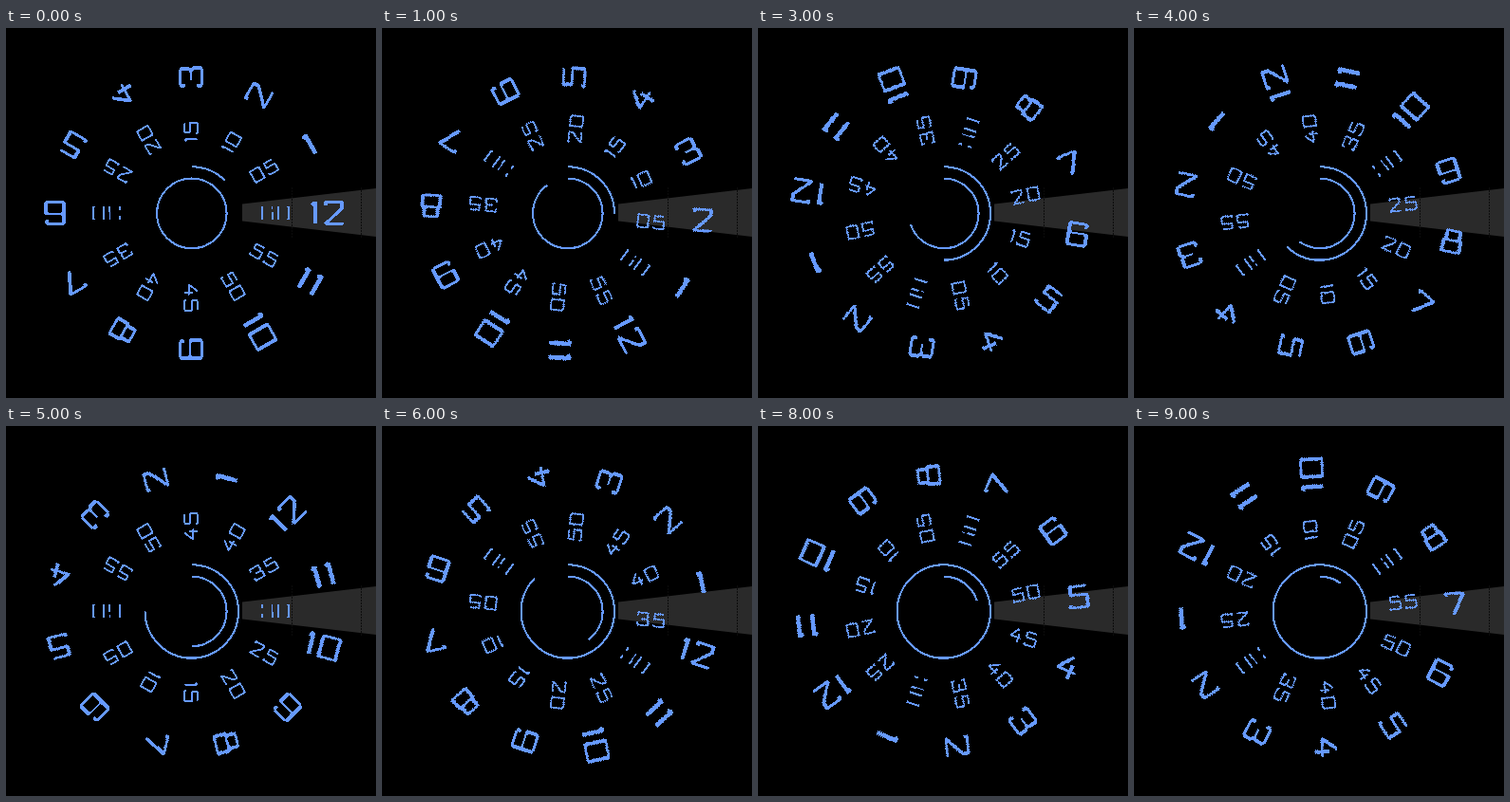
Animation, 390 px wide and 390 px high, one loop 10 s. Source, as an HTML page with a canvas:

```html
<!DOCTYPE html>
<html lang="en">
<head>
<meta charset="utf-8">
<title>Rotating dial clock</title>
<style>
  html, body { margin: 0; width: 100%; height: 100%; overflow: hidden; background: #000; }
  canvas { display: block; width: 390px; height: 390px; }
</style>
</head>
<body>
<canvas id="dial" width="390" height="390" role="img" aria-label="Dial clock with hours 1 to 12 and minutes 05 to 60"></canvas>
<script>
const SIZE = 390, MID = SIZE / 2, BLUE = '#6699ff';
const STEP = 1000, STEPS = 10;
const ctx = document.getElementById('dial').getContext('2d');
const rad = deg => deg * Math.PI / 180;

// Centre lines of the digits in a 17 by 22 box.
const GLYPHS = [
  'M0 0H17V22H0Z',
  'M1 3L4 0V22',
  'M0 3V0H16V6L0 22H17',
  'M0 5V0H16V9L14 11L17 13V22H0V17M6 11H14',
  'M11 0L0 15H18M13 8V23',
  'M16 0H1V9H17V22H0V19',
  'M16 4V0H0V22H17V10H0',
  'M0 3V0H17L7 22',
  'M2 0H15V10H17V22H0V10H2ZM2 10H15',
  'M1 18V22H17V0H0V12H17'
].map(d => new Path2D(d));
const GAP = 9;
const glyphWidth = d => d === '1' ? 5 : 17;

// Draws in blue on a new layer and removes the soft edges.
function hardLayer(draw) {
  const canvas = document.createElement('canvas');
  canvas.width = canvas.height = SIZE;
  const c = canvas.getContext('2d');
  c.strokeStyle = BLUE;
  c.lineJoin = 'bevel';
  draw(c);
  const image = c.getImageData(0, 0, SIZE, SIZE);
  const px = image.data;
  for (let i = 0; i < px.length; i += 4) {
    px.set([102, 153, 255, px[i + 3] > 115 ? 255 : 0], i);
  }
  c.putImageData(image, 0, 0);
  return canvas;
}

// Strokes each digit twice, side by side, for heavier uprights.
function drawLabel(c, text, { sx, sy, weight, boldOne, spread, centred }, barsOnly) {
  const digits = [...text];
  const total = digits.reduce((w, d) => w + glyphWidth(d), GAP * (digits.length - 1));
  c.scale(sx, sy);
  c.translate(centred ? -total / 2 : 0, -11);
  for (const d of digits) {
    c.lineWidth = d === '1' ? weight * boldOne : weight;
    c.translate(-spread, 0);
    c.stroke(GLYPHS[d]);
    c.translate(2 * spread, 0);
    c.stroke(GLYPHS[d]);
    c.translate(-spread, 0);
    if (barsOnly) c.clearRect(1.8, -3, 13, 28);
    c.translate(glyphWidth(d) + GAP, 0);
  }
}

function makeRing(labels, radius, style) {
  return hardLayer(c => labels.forEach((text, i) => {
    c.save();
    c.translate(MID, MID);
    c.rotate(rad(-30 * (i + 1)));
    c.translate(radius, 0);
    drawLabel(c, text, style, text === '30' || text === '60');
    c.restore();
  }));
}

const count = Array.from({ length: 12 }, (_, i) => i + 1);
const hours = makeRing(count.map(String), 143.5,
  { sx: 1.08, sy: 1.02, weight: 2.3, boldOne: 1.3, spread: .6, centred: true });
const minutes = makeRing(count.map(n => String(n * 5).padStart(2, '0')), 75.2,
  { sx: .64, sy: .6, weight: 2.3, boldOne: 1, spread: .2, centred: false });

function drawPointer() {
  ctx.fillStyle = '#2a2a2a';
  ctx.beginPath();
  ctx.moveTo(249, 185.5);
  ctx.lineTo(SIZE, 169);
  ctx.lineTo(SIZE, 220);
  ctx.lineTo(249, 203.5);
  ctx.fill();
  ctx.strokeStyle = '#0c0c0c';
  ctx.lineWidth = 1;
  ctx.setLineDash([2, 1]);
  for (const x of [301.5, 374.5]) {
    ctx.beginPath();
    ctx.moveTo(x, 168);
    ctx.lineTo(x, 222);
    ctx.stroke();
  }
  ctx.setLineDash([]);
}

function drawRing(ring, deg) {
  ctx.save();
  ctx.imageSmoothingEnabled = false;
  ctx.translate(MID, MID);
  ctx.rotate(rad(deg));
  ctx.drawImage(ring, -MID, -MID);
  ctx.restore();
}

function drawArc(c, radius, sweep) {
  c.lineWidth = 2;
  c.beginPath();
  c.arc(195.8, 195.4, radius, rad(-90), rad(sweep - 90));
  c.stroke();
}

function render(step) {
  ctx.fillStyle = '#000';
  ctx.fillRect(0, 0, SIZE, SIZE);
  drawPointer();
  drawRing(hours, 63 * step);
  drawRing(minutes, 36 * step);
  ctx.drawImage(hardLayer(c => {
    drawArc(c, 49.2, Math.min(360, 45 * (step + 1)));
    drawArc(c, 36.8, 360 - 36 * step);
  }), 0, 0);
}

const start = performance.now();
let shown = -1;
function tick() {
  const step = Math.floor((performance.now() - start) / STEP) % STEPS;
  if (step !== shown) render(shown = step);
  requestAnimationFrame(tick);
}
tick();
</script>
</body>
</html>
```
